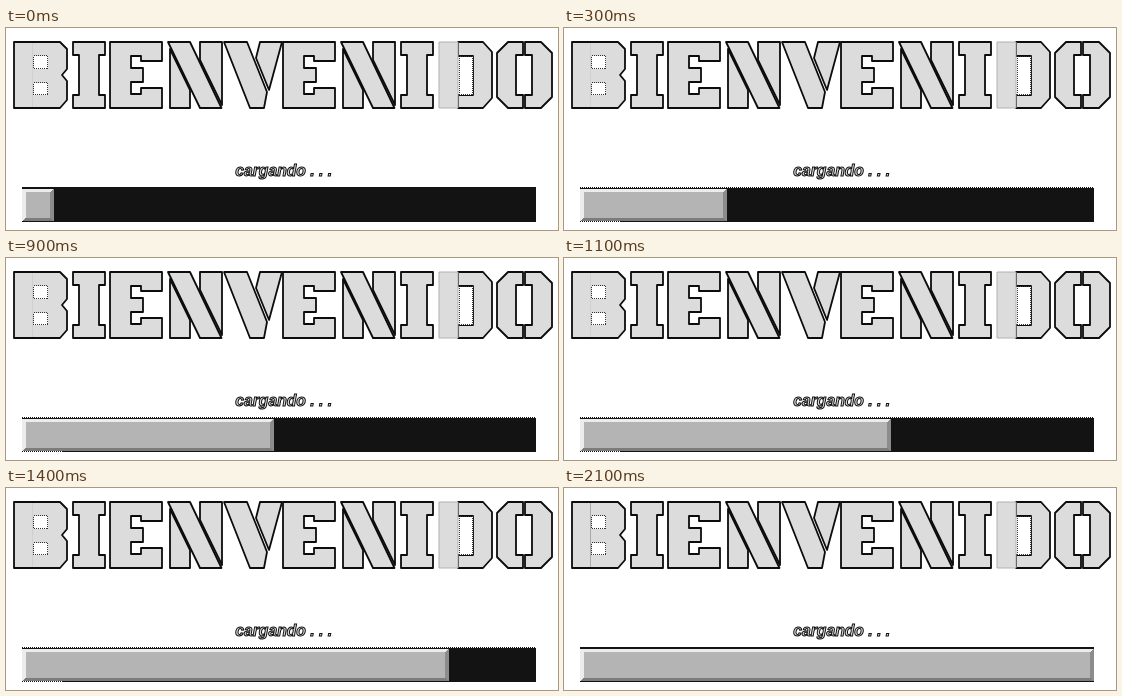
An HTML page for the animation above (3.1 s loop, 552x202 px).

```html
<!DOCTYPE html>
<html lang="es">
<head>
<meta charset="utf-8">
<title>Bienvenido</title>
<style>
html, body { margin: 0; width: 100%; height: 100%; overflow: hidden; background: #fff; }
svg { display: block; width: 552px; height: 202px; }
.face { fill: #dcdcdc; stroke: #0c0c0c; stroke-width: 1.8; stroke-linejoin: round; }
.soft { fill: #dcdcdc; stroke: #b0b0b0; stroke-width: 1; }
.hole { fill: #fff; stroke: #333; stroke-width: 1; stroke-dasharray: 1 1; }
.label { font: italic bold 15.7px "Liberation Sans", Arial, sans-serif; }
</style>
</head>
<body>
<svg viewBox="0 0 552 202" xmlns="http://www.w3.org/2000/svg">
  <rect width="552" height="202" fill="#fff"/>
  <g id="title"></g>
  <text class="label" x="229.3" y="148" fill="#d8d8d8" stroke="#111" stroke-width="1">cargando . . .</text>
  <g shape-rendering="crispEdges">
    <rect x="16" y="159" width="514" height="35" fill="#131313"/>
    <path id="body" fill="#b4b4b4"/>
    <path id="light" fill="#ececec"/>
    <path id="dark" fill="#7c7c7c"/>
    <path id="side" fill="#8c8c8c"/>
    <path id="dots" d="M17 193.5H56M17 159.5H530" stroke="#fff" stroke-dasharray="1 1"/>
  </g>
</svg>
<script>
const $ = id => document.getElementById(id);
const title = $("title");

function add(cls, d, x = 0, y = 0) {
  const p = document.createElementNS("http://www.w3.org/2000/svg", "path");
  p.setAttribute("class", cls);
  p.setAttribute("d", d);
  p.setAttribute("transform", `translate(${x} ${y})`);
  title.append(p);
  return p;
}

function letter(x, ...parts) {
  for (const d of parts) add("face", d, x);
}

function hole(d) {
  add("hole", d, .5, .5).setAttribute("shape-rendering", "crispEdges");
}

const I = "M0 14H32V27H26V67H32V80H0V67H6V27H0Z";
const E = "M0 14H52V33H31V28H21V40H33V54H21V66H31V60H52V80H0Z";
const N = ["M0 14H22L53.5 80H32Z", "M2 21L22 62V80H2Z", "M32 14H54V77L32 32Z"];
const V = ["M0 14H23L43 64L40 80H26Z", "M36 14H58L45 62L32 30Z"];
const O = [
  "M11 14H26V27H19V67H26V80H11L0 69V25Z",
  "M28 14H44L55 25V69L44 80H28V67H35V27H28Z"
];

letter(8, "M0 14H46L53 21V41L48 47L53 53V72L46 80H0Z");
const join = add("", "M26.5 15V79");
hole("M27 27H41V40H27Z");
hole("M27 54H41V66H27Z");
letter(67, I);
letter(104, E);
letter(162, ...N);
letter(218, ...V);
letter(277, E);
letter(335, ...N);
letter(395, I);
letter(433, "M19 14H44L53 24V70L44 80H19V67H34V28H19Z");
add("soft", "M433 14H452V80H433Z");
hole("M453 28H466V66H453Z");
letter(491, ...O);

// Start time and right end of the bar.
const LOOP = 3100;
const steps = [
  [0, 48], [100, 107], [300, 163], [800, 213], [900, 268],
  [1100, 327], [1300, 410], [1400, 443], [1600, 490], [2100, 530]
];

function draw(t) {
  const r = steps.filter(s => s[0] <= t).pop()[1];
  const l = 16, top = 161, low = 193;
  $("body").setAttribute("d", `M${l} ${top}H${r}V${low}H${l}Z`);
  $("light").setAttribute("d",
    `M${l} ${top}H${r}L${r - 4} ${top + 3}H${l + 4}V${low - 3}L${l} ${low}Z`);
  $("dark").setAttribute("d",
    `M${l} ${low}L${l + 4} ${low - 3}H${r - 4}L${r} ${low}Z`);
  $("side").setAttribute("d",
    `M${r} ${top}V${low}L${r - 4} ${low - 3}V${top + 3}Z`);
  $("dots").style.display = t < 100 || t >= 2100 ? "none" : "";
  join.setAttribute("stroke", t >= 2100 ? "#aaa" : "#d0d0d0");
}

const start = performance.now();
function tick() {
  draw((performance.now() - start) % LOOP);
  requestAnimationFrame(tick);
}
draw(0);
requestAnimationFrame(tick);
</script>
</body>
</html>
```
